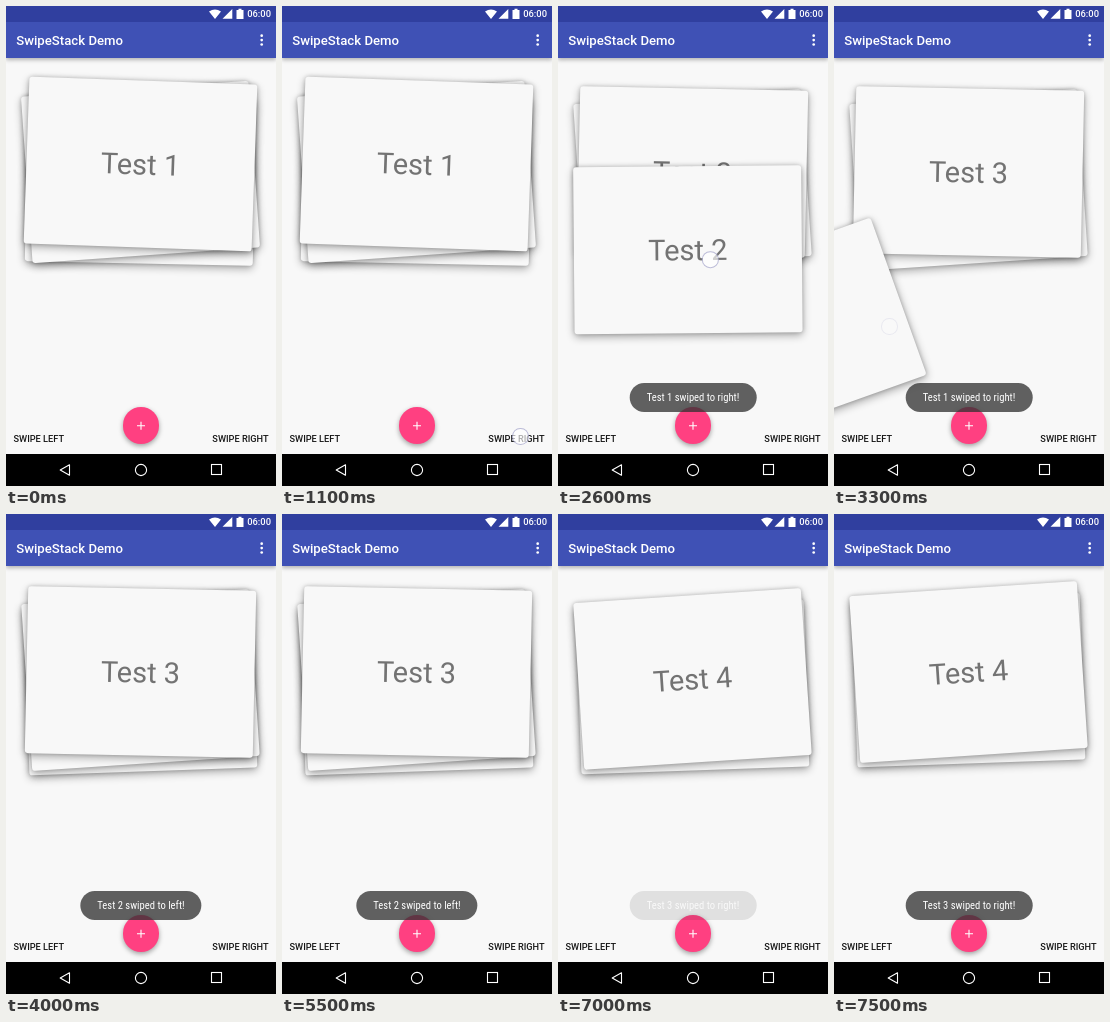
Write an HTML page that moves like this. It is 270x480 px and loops after 8000 ms.

```html
<!DOCTYPE html>
<html lang="en">
<head>
<meta charset="utf-8">
<title>Card stack demo</title>
<style>
html, body { margin: 0; width: 100%; height: 100%; overflow: hidden; background: #f8f8f8; }
body { font-family: Roboto, sans-serif; }
#stage { position: absolute; left: 0; top: 0; width: 270px; height: 480px; overflow: hidden; }
#stage > *, .card { position: absolute; }
#stack { left: 0; top: 0; z-index: 0; }
.card {
  left: -114px; top: -83.5px; width: 228px; height: 167px; border-radius: 3px;
  background: #f8f8f8; color: #737373; font-size: 29px; line-height: 169px; text-align: center;
  box-shadow: 0 3px 8px rgba(0,0,0,.32), 0 0 4px rgba(0,0,0,.2);
}
#bar {
  left: 0; top: 0; width: 270px; height: 52px; color: #fff; font-weight: 500;
  background: linear-gradient(#303f9f 15.75px, #3f51b5 15.75px);
  box-shadow: 0 2px 4px rgba(0,0,0,.28);
}
#bar span { position: absolute; white-space: nowrap; }
#title { left: 10.2px; top: 27px; font-size: 13.2px; line-height: 16px; }
#clock { right: 5px; top: 2px; font-size: 9.4px; line-height: 11px; }
.button { top: 427px; font-size: 9.2px; line-height: 12px; font-weight: 500; color: #161616; white-space: nowrap; }
#fab {
  left: 116.6px; top: 401.3px; width: 36.8px; height: 36.8px; border-radius: 50%; background: #ff4081;
  box-shadow: 0 2px 5px rgba(0,0,0,.36);
}
#nav { left: 0; top: 448px; width: 270px; height: 32px; background: #000; }
#icons { left: 0; top: 0; }
.toast {
  left: 135px; top: 377px; padding: 0 17px; border-radius: 15px; transform: translateX(-50%);
  background: rgba(50,50,50,.77); color: #fff; white-space: nowrap;
  font: 400 10.6px/29px "Roboto Condensed", Roboto, sans-serif; font-stretch: 75%;
}
#touch {
  left: -8px; top: -8px; width: 14.5px; height: 14.5px; border-radius: 50%;
  background: rgba(255,255,255,.65); border: .8px solid rgba(110,110,170,.45);
}
</style>
</head>
<body>
<div id="stage">
  <div id="stack"></div>
  <div id="bar"><span id="title">SwipeStack Demo</span><span id="clock">06:00</span></div>
  <div class="button" style="left:7.5px">SWIPE LEFT</div>
  <div class="button" style="right:7.5px">SWIPE RIGHT</div>
  <div id="fab"></div>
  <div id="nav"></div>
  <svg id="icons" width="270" height="480" fill="#fff">
    <path d="M203 5.6Q209 1.2 215 5.6L209 13ZM226.3 3V12.8H216.5Z"/>
    <path d="M230.5 4h2v-1.2h3V4h2v9h-7z"/>
    <circle cx="255.7" cy="29.7" r="1.35"/><circle cx="255.7" cy="34.1" r="1.35"/><circle cx="255.7" cy="38.5" r="1.35"/>
    <g fill="none" stroke="#fff" stroke-width="1.1">
      <path d="M131 419.7h8M135 415.7v8"/>
      <path d="M54.2 464L63.5 458.8V469.2Z" stroke-linejoin="round"/>
      <circle cx="135" cy="464" r="5.6"/>
      <rect x="205.5" y="458.5" width="10" height="10"/>
    </g>
  </svg>
  <div id="touch"></div>
</div>
<script>
const LOOP = 8000, CX = 134.5, TOP = 157.5, GAP = 8, MOVE = 300, WIDTH = 270, SWING = 30;
const stage = document.getElementById('stage');
const touch = document.getElementById('touch');

const clamp = v => Math.min(1, Math.max(0, v));
const ease = v => (1 - Math.cos(Math.PI * clamp(v))) / 2;
const mix = (a, b, k) => a + (b - a) * k;

function add(parent, name, text) {
  const el = document.createElement('div');
  el.className = name;
  el.textContent = text;
  parent.append(el);
  return el;
}

// Interpolates rows of [time, x, y].
function track(rows, t) {
  let i = 1;
  while (i < rows.length - 1 && t > rows[i][0]) i++;
  const a = rows[i - 1], b = rows[i], k = clamp((t - a[0]) / (b[0] - a[0]));
  return [mix(a[1], b[1], k), mix(a[2], b[2], k)];
}

const tilts = [2, -4, 1.2, -3.8, -2];
const stack = document.getElementById('stack');
const cards = tilts.map((_, i) => add(stack, 'card', 'Test ' + (i + 1)));
cards.forEach((card, i) => card.style.zIndex = 9 - i);

const removals = [1430, 3370, 6930];
const drag = [
  [2300, CX, TOP], [2340, CX, 163], [2600, 130, 243], [2900, 88, 312],
  [3200, 12, 328], [3300, -41.5, 328], [3370, CX - WIDTH, 328]
];
const finger = [[2300, 156, 168], [2600, 152, 253], [2900, 115, 312], [3200, 55, 320]];

const toasts = [
  ['Test 1 swiped to right!', 1460, 3460],
  ['Test 2 swiped to left!', 3460, 5480],
  ['Test 3 swiped to right!', 6960, 9000]
].map(([text, from, to]) => ({ el: add(stage, 'toast', text), from, to }));
stage.append(touch);

function drawCards(t) {
  const gone = removals.reduce((n, at) => n + ease((t - at) / MOVE), 0);
  cards.forEach((card, i) => {
    const depth = Math.max(0, i - gone), end = removals[i];
    const shown = clamp(3 - depth);
    // A new card slides down from the top place to the back.
    let x = CX, y = TOP + GAP * (depth > 2 ? 2 * shown : depth), tilt = tilts[i];
    if (i === 1) {
      if (t >= drag[0][0]) {
        [x, y] = track(drag, t);
        tilt = SWING * (x - CX) / WIDTH;
      }
    } else if (end) {
      const k = ease((t - end + MOVE) / MOVE);
      x += WIDTH * k;
      tilt = mix(tilt, SWING, k);
    }
    card.style.transform = `translate(${x}px,${y}px) rotate(${tilt}deg)`;
    card.style.opacity = t >= end ? 0 : shown;
  });
}

function drawToasts(t) {
  for (const { el, from, to } of toasts) {
    const enter = 1 - (1 - clamp((t - from) / 500)) ** 2;
    const leave = clamp((t - to) / 500) ** 2;
    el.style.opacity = enter * (1 - leave);
  }
}

function drawTouch(t) {
  const tap = (t >= 1060 && t < 1220) || (t >= 6460 && t < 6700);
  const dragging = t >= 2260 && t < 3350;
  const [x, y] = dragging ? track(finger, t) : [238, 430];
  touch.style.transform = `translate(${x}px,${y}px)`;
  touch.style.opacity = tap ? 1 : dragging ? 1 - .75 * clamp((t - 3200) / 100) : 0;
}

function frame(now) {
  const t = now % LOOP;
  drawCards(t);
  drawToasts(t);
  drawTouch(t);
  requestAnimationFrame(frame);
}
frame(0);
</script>
</body>
</html>
```
